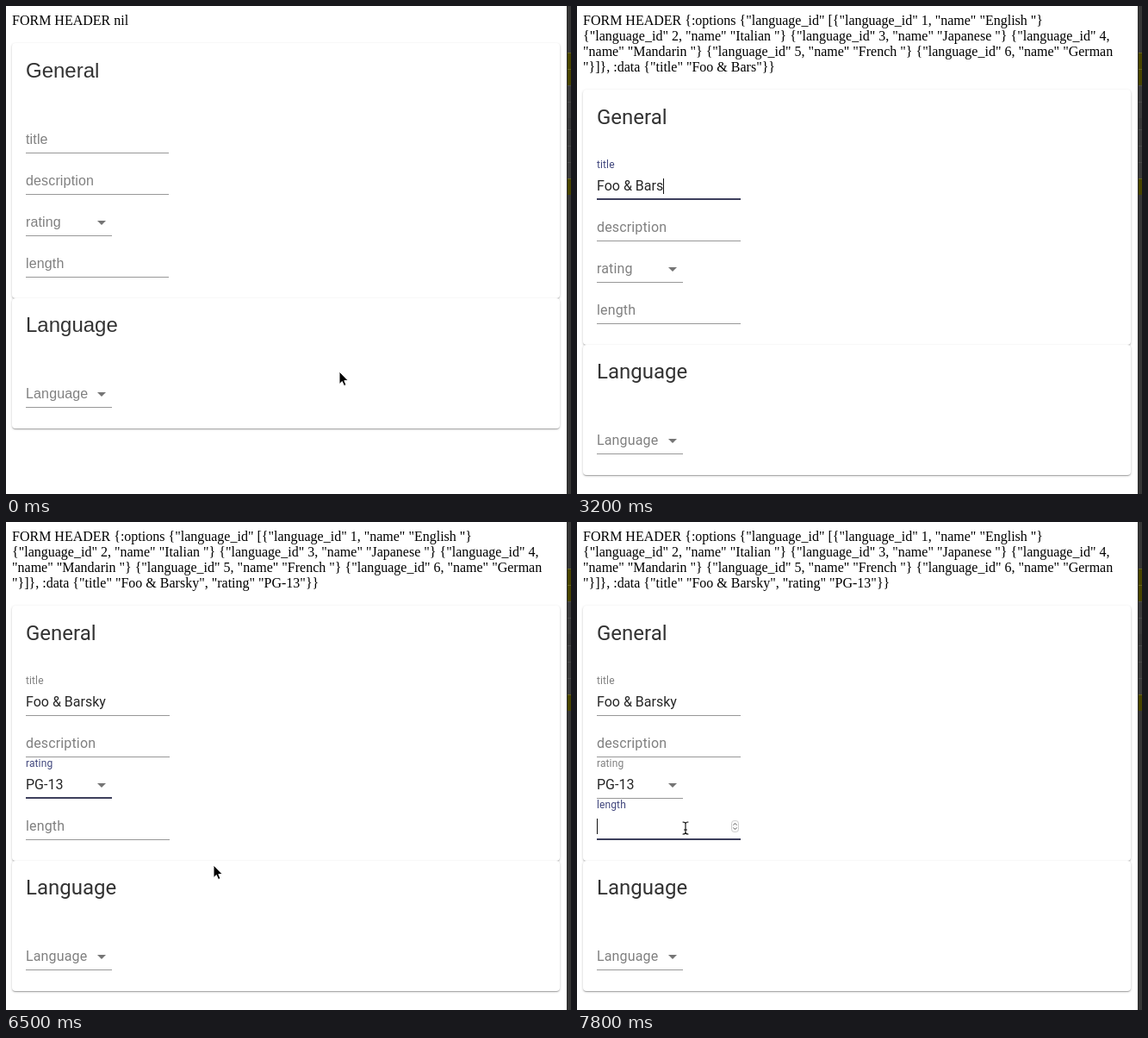
An HTML page that plays this animation: 656 by 566 pixels, repeating every 8000 ms.

```html
<!DOCTYPE html>
<html lang="en">
<head>
<meta charset="utf-8">
<title>Film form</title>
<style>
  html, body { margin: 0; width: 100%; height: 100%; overflow: hidden; background: #fff; }
  #stage { position: relative; width: 656px; height: 566px; overflow: hidden; background: #fff; }
  #page, #form, svg { position: absolute; left: 0; top: 0; }
  svg { width: 656px; height: 566px; overflow: visible; }
  text { white-space: pre; }
  .log { font: 16px "Liberation Serif", serif; fill: #000; }
  #form { font-family: Roboto, sans-serif; }
  #form.fallback { font-family: "Liberation Sans", sans-serif; }
  .title { font-size: 24px; fill: #333; }
  .value { font-size: 16px; fill: #262626; }
  .label { font-size: 16px; letter-spacing: .15px; fill: #808080; }
  .label.focus { fill: #41477d; }
  .line { fill: #989898; }
  .ink { fill: #3d3f5c; }
  .caret { fill: #111; }
  .arrow { fill: #757575; }
  .card {
    position: absolute; left: 7px; width: 636px; background: #fff; border-radius: 4px;
    box-shadow: 0 1px 3px rgba(0,0,0,.2), 0 1px 1px rgba(0,0,0,.14), 0 2px 1px -1px rgba(0,0,0,.12);
  }
  #menu {
    position: absolute; left: 23px; top: 66px; width: 189px; padding: 8px 0; box-sizing: border-box;
    background: #fff; border-radius: 4px; transform-origin: 0 239px;
    font: 16px/48px Roboto, sans-serif; color: #262626;
    box-shadow: 0 5px 5px -3px rgba(0,0,0,.2), 0 8px 10px 1px rgba(0,0,0,.14), 0 3px 14px 2px rgba(0,0,0,.12);
  }
  #menu div { padding: 0 16px; }
  #menu .hover { background: #ebebeb; }
  #edge { position: absolute; left: 651px; top: 0; width: 5px; height: 566px; background: #363636; border-left: 1px solid #2a2a2a; box-sizing: border-box; }
  #edge i { position: absolute; left: 0; width: 4px; height: 18px; background: #3b3b3b; border-top: 1px solid #4b4b4b; }
  #edge i.mark { background: #484400; border-color: #67621c; }
</style>
</head>
<body>
<div id="stage">
  <div id="page">
    <svg id="log"></svg>
    <div id="form">
      <div class="card" style="top:43px;height:296px"></div>
      <div class="card" style="top:339px;height:151px"></div>
      <svg id="fields"></svg>
    </div>
  </div>
  <div id="menu"></div>
  <div id="edge"></div>
  <svg id="pointer">
    <g id="arrow">
      <path d="M0 0V14.6L3.3 11.5 5.5 16.6 8 15.5 5.8 10.6H10.3Z" fill="#000" stroke="#fff" stroke-width="1"/>
    </g>
    <g id="beam" fill="none" stroke-linecap="round">
      <path d="M-3-7Q0-7 0-5Q0-7 3-7M0-5V5M-3 7Q0 7 0 5Q0 7 3 7M-1.5 2H1.5" stroke="#fff" stroke-width="2.6"/>
      <path d="M-3-7Q0-7 0-5Q0-7 3-7M0-5V5M-3 7Q0 7 0 5Q0 7 3 7M-1.5 2H1.5" stroke="#000" stroke-width="1.1"/>
    </g>
    <g id="hand" fill="#fff" stroke="#000" stroke-width="1.1" stroke-linejoin="round">
      <path d="M-2 10V1.4Q-2 0-.7 0T.8 1.4V6Q2.6 4.4 3.5 6.3 5.3 4.9 6.2 6.9 8.2 6 8.3 8.4V11.5Q8.3 13.5 7 15V17.5H-1V15.6L-5.4 10.5Q-6.6 8.6-5 8.2-3.6 8-2 10Z"/>
      <path d="M.8 6V9M3.5 6.5V9M6.2 7V9.3M1 11.5V14.5M3.2 11.5V14.5M5.4 11.5V14.5" fill="none" stroke-width=".9"/>
    </g>
  </svg>
</div>
<script>
const LOOP = 8000, STEP = 100;
const $ = id => document.getElementById(id);

function add(parent, tag, attrs, text = '') {
  const el = document.createElementNS('http://www.w3.org/2000/svg', tag);
  for (const k in attrs) el.setAttribute(k, attrs[k]);
  el.textContent = text;
  parent.append(el);
  return el;
}
const show = (el, on) => { el.style.display = on ? '' : 'none'; };
const between = (t, a, b) => t >= a && t < b;
const tween = (t, start, dur = 200) => 1 - (1 - Math.min(1, Math.max(0, (t - start) / dur))) ** 3;

// Header dump
const options = [
  'FORM HEADER {:options {"language_id" [{"language_id" 1, "name" "English "}',
  '{"language_id" 2, "name" "Italian "} {"language_id" 3, "name" "Japanese "} {"language_id" 4,',
  '"name" "Mandarin "} {"language_id" 5, "name" "French "} {"language_id" 6, "name" "German'
];
const logLines = [22, 40, 58, 76].map(y => add($('log'), 'text', { x: 7, y, class: 'log' }));

// Fields; y is the text baseline
const svg = $('fields');
add(svg, 'text', { x: 23, y: 83, class: 'title' }, 'General');
add(svg, 'text', { x: 23, y: 378, class: 'title' }, 'Language');

function field(name, y, select, focusAt = Infinity, blurAt = Infinity) {
  const width = select ? 100 : 167;
  const line = add(svg, 'rect', { x: 23, y: y + 10, width, height: 1, class: 'line' });
  const ink = add(svg, 'rect', { y: y + 9, height: 2, class: 'ink' });
  const label = add(svg, 'text', { class: 'label' }, name);
  const value = add(svg, 'text', { x: 23, y, class: 'value' });
  const caret = add(svg, 'rect', { y: y - 14, width: 1, height: 18, class: 'caret' });
  if (select) add(svg, 'path', { d: `M106 ${y - 7}h10l-5 5z`, class: 'arrow' });
  return (t, text = '', caretOn = false) => {
    const up = tween(t, focusAt);
    const w = width * (up - tween(t, blurAt));
    if (!select) line.setAttribute('width', t < 200 ? 166 : 167);
    ink.setAttribute('x', 23 + (width - w) / 2);
    ink.setAttribute('width', w);
    label.setAttribute('transform', `translate(23 ${y - 26 * up}) scale(${1 - up / 4})`);
    label.classList.toggle('focus', between(t, focusAt, blurAt));
    value.textContent = text;
    show(caret, caretOn);
    if (caretOn) caret.setAttribute('x', Math.round(23 + (text ? value.getComputedTextLength() : 0)));
  };
}
const title = field('title', 160, false, 1100, 4430);
const description = field('description', 208, false);
const rating = field('rating', 256, true, 4420, 6650);
const length = field('length', 304, false, 7450);
const language = field('Language', 455, true);

const spinner = add(svg, 'g', { fill: 'none', stroke: '#555' });
add(spinner, 'rect', { x: 179.5, y: 292.5, width: 8, height: 13, rx: 3, fill: '#fafafa', stroke: '#ccc' });
add(spinner, 'path', { d: 'M181.5 297.5l2-2 2 2M181.5 300.5l2 2 2-2' });

// Dropdown
const ratings = ['G', 'PG', 'PG-13', 'R', 'NC-17', 'TV-Y', 'TV-G', 'TV-PG', 'TV-14', 'TV-MA'];
const items = ratings.map(r => {
  const el = document.createElement('div');
  el.textContent = r;
  $('menu').append(el);
  return el;
});

// Window behind the page
for (const [y, mark] of [[54, 1], [73, 1], [92], [111], [143], [162], [181], [200, 1]]) {
  const row = document.createElement('i');
  row.style.top = y + 'px';
  if (mark) row.className = 'mark';
  $('edge').append(row);
}

// Typing: time of each key
const phrase = 'Foo & Barsky';
const keys = [1900, 2000, 2100, 2300, 2400, 2600, 2900, 3000, 3100, 3200, 3300, 3400];

// Pointer: time, x, y, shape
const path = [
  [0, 387, 424, 'arrow'], [500, 387, 424, 'arrow'], [800, 270, 482, 'arrow'],
  [1100, 112, 213, 'beam'], [1400, 106, 211, 'beam'], [1900, 106, 211, ''],
  [3700, 106, 211, 'beam'], [3900, 104, 300, 'hand'], [4100, 102, 482, 'hand'],
  [4400, 107, 302, 'hand'], [4600, 107, 299, 'hand'], [4700, 107, 299, 'hand'],
  [5400, 80, 194, 'hand'], [5800, 80, 194, 'arrow'], [6400, 239, 397, 'arrow'],
  [6500, 241, 398, 'arrow'], [6600, 241, 398, 'arrow'], [7000, 176, 366, 'beam'],
  [7100, 174, 365, 'beam'], [7200, 174, 365, 'beam'], [7300, 173, 364, 'beam'],
  [7600, 126, 355, 'beam'], [LOOP, 126, 355, 'beam']
];
function movePointer(t) {
  const i = path.findIndex(p => p[0] > t);
  const [t0, x0, y0, shape] = path[i - 1], [t1, x1, y1] = path[i];
  const p = (t - t0) / (t1 - t0);
  for (const id of ['arrow', 'beam', 'hand']) show($(id), id === shape);
  if (shape) $(shape).setAttribute('transform', `translate(${Math.round(x0 + (x1 - x0) * p)} ${Math.round(y0 + (y1 - y0) * p)})`);
}

function render(t) {
  const loaded = t >= 100, picked = t >= 5700;
  const typed = phrase.slice(0, keys.filter(k => k <= t).length);

  const data = typed ? `, :data {"title" "${typed}"${picked ? ', "rating" "PG-13"' : ''}}}` : '}';
  const lines = loaded ? [...options, '"}]}' + data] : ['FORM HEADER nil'];
  logLines.forEach((el, i) => { el.textContent = lines[i] || ''; });

  $('form').style.transform = `translateY(${loaded ? 54 : 0}px)`;
  $('form').classList.toggle('fallback', t < 200);
  const scroll = Math.round(2 * (tween(t, 6600, 300) - tween(t, 7300, 300)));
  $('page').style.transform = `translateY(${-scroll}px)`;

  title(t, typed, between(t, 1100, 1600) || between(t, 1900, 3900));
  description(t);
  rating(t, picked ? 'PG-13' : '');
  length(t, '', t >= 7500);
  language(t);
  show(spinner, t >= 7500);

  const open = tween(t, 4600, 300) * (1 - tween(t, 5700, 300));
  show($('menu'), open > 0);
  $('menu').style.opacity = open;
  $('menu').style.transform = picked ? '' : `scale(${.75 + open / 4}, ${.5625 + .4375 * open})`;
  items.forEach((el, i) => el.classList.toggle('hover', i === 2 && t >= 5300));

  movePointer(t);
}

const begin = performance.now();
function tick() {
  const t = (performance.now() - begin) % LOOP;
  render(Math.floor(t / STEP) * STEP);
  requestAnimationFrame(tick);
}
tick();
</script>
</body>
</html>
```
